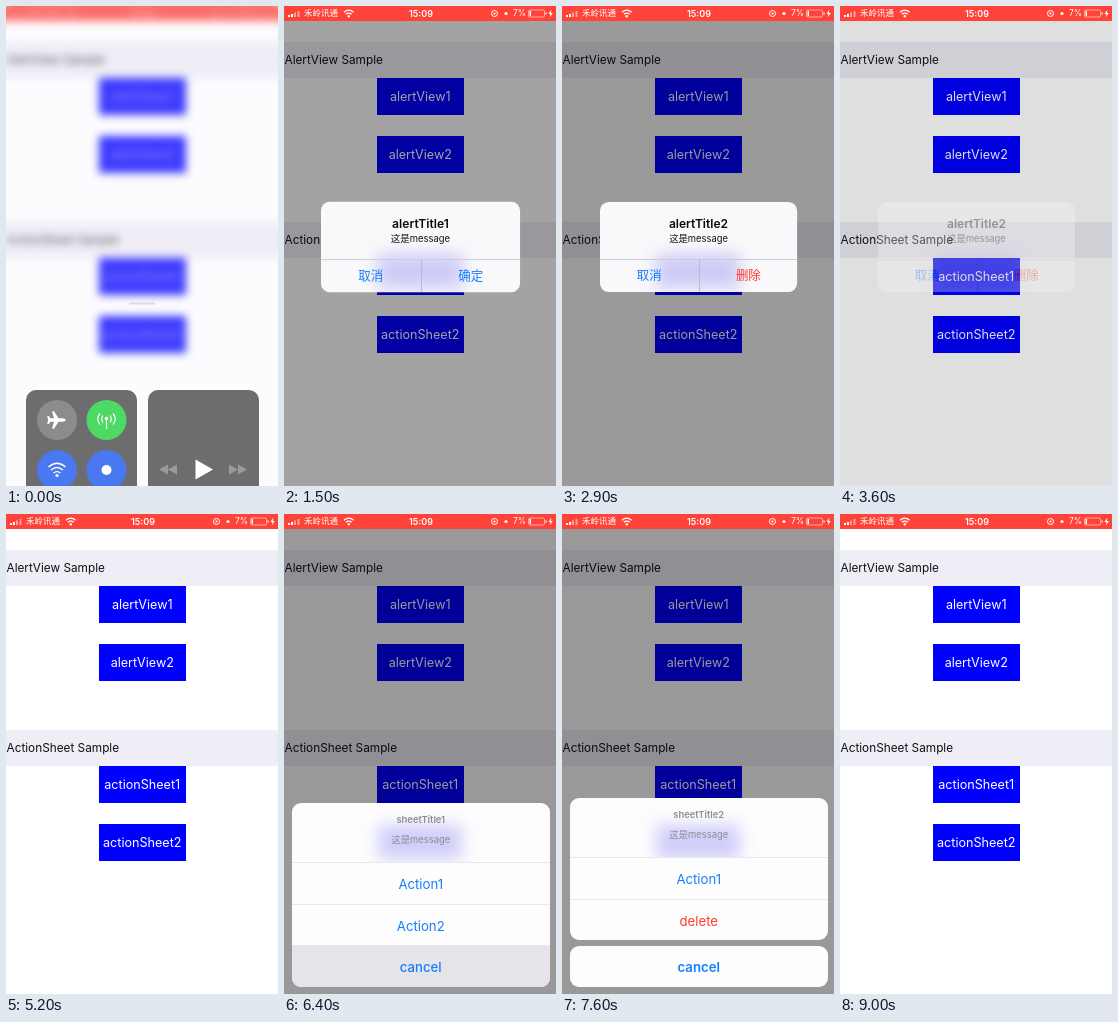
These frames come from a looping animation (272x480 px, 9100 ms). An HTML page:

```html
<!DOCTYPE html>
<html lang="zh-CN">
<head>
<meta charset="utf-8">
<title>Alert and sheet demo</title>
<style>
  html, body { margin: 0; width: 100%; height: 100%; overflow: hidden; background: #fff; }
  body { position: relative; font-family: Inter, "Noto Sans CJK SC", "Noto Sans CJK", sans-serif; }
  #stage { position: absolute; left: 0; top: 0; width: 272px; height: 480px; overflow: hidden; background: #fff; }
  #stage div, #stage svg { position: absolute; box-sizing: border-box; white-space: nowrap; }
  .full { inset: 0; }

  /* page */
  .head { left: -20px; width: 312px; height: 36px; padding-left: 20.5px; background: #efedf5;
    color: #111; font-size: 11.8px; line-height: 36px; }
  .btn { left: 92.5px; width: 87.5px; height: 36.5px; background: #00f; color: #fff;
    font-size: 12.6px; line-height: 38px; text-align: center; }
  .status { left: 0; top: 0; width: 272px; height: 15px; background: #ff4338; color: #fff;
    box-shadow: 0 -14px #ff4338, -20px 0 #ff4338, 20px 0 #ff4338; font-size: 8.5px; line-height: 15px; }
  .page, .status { animation: sharpen .04s .05s step-end both; }
  .btn, .status div, .status svg { animation: reveal .04s .05s step-end both; }

  /* control centre */
  .centre { animation: vanish .04s .05s step-end both; }
  .veil { background: rgba(244, 238, 250, .25); }

  /* overlays */
  .dim { background: rgba(0, 0, 0, .4); }
  .glow { width: 84px; height: 34px; background: rgba(30, 20, 230, .2); filter: blur(8px); }
  .alert { left: 38px; top: 196px; width: 197px; height: 89.5px; border-radius: 9px; overflow: hidden;
    text-align: center; background: #f9f9fb; }
  .alert .glow { left: 56px; top: 52px; }
  .alert .title { top: 13px; width: 100%; font-size: 12px; line-height: 17px; font-weight: 600; color: #0a0a0a; }
  .alert .msg { top: 30px; width: 100%; font-size: 9.35px; line-height: 14px; color: #111; }
  .alert .pick { top: 57px; width: 50%; height: 33px; border-top: 1px solid #cdccd6;
    font-size: 12.4px; line-height: 31px; color: #157efb; }
  .alert .pick + .pick { left: 50%; border-left: 1px solid #bcbbc9; }
  .sheet { left: 8px; width: 257.5px; text-align: center; }
  .card { left: 0; width: 100%; border-radius: 9px; overflow: hidden; background: #fdfdfe; }
  .info { left: 0; top: 0; width: 100%; height: 59px; overflow: hidden; color: #8e8d93; font-size: 9.4px; }
  .info .glow { left: 86px; }
  .info .title, .info .msg { width: 100%; line-height: 14px; }
  .info .title { top: 10px; font-weight: 600; }
  .info .msg { top: 30px; }
  .row { left: 0; width: 100%; height: 41.5px; border-top: 1px solid #e8e7ee;
    font-size: 13.2px; line-height: 42px; color: #157efb; }
  #stage .red { color: #ff3b30; }

  /* timeline */
  .a1 .dim { animation: fade .7s 1.1s cubic-bezier(.3, .3, .2, 1) both, unfade .4s 2s ease-out forwards; }
  .a1 .alert { animation: fade .35s 1.1s ease-out both, shrink .6s 1.1s cubic-bezier(.3, .3, .2, 1) both,
    unfade .4s 2s ease-out forwards; }
  .a2 .dim { animation: fade .6s 2.4s cubic-bezier(.2, .5, .2, 1) both, unfade .6s 3.3s ease-out forwards; }
  .a2 .alert { animation: fade .35s 2.4s ease-out both, shrink .6s 2.4s cubic-bezier(.2, .5, .2, 1) both,
    unfade .6s 3.3s ease-out forwards; }
  .s1 .dim { animation: fade .6s 5.2s cubic-bezier(.25, .6, .2, 1) both, unfade .5s 6.4s ease-in-out forwards; }
  .s1 .sheet { animation: rise .6s 5.2s cubic-bezier(.25, .6, .2, 1) both, drop .5s 6.4s ease-in-out forwards; }
  .s2 .dim { animation: fade .6s 7s cubic-bezier(.25, .6, .2, 1) both, unfade .5s 8.5s ease-in-out forwards; }
  .s2 .sheet { animation: rise .6s 7s cubic-bezier(.25, .6, .2, 1) both, drop .5s 8.5s ease-in-out forwards; }
  .pressed { animation: press .04s 6.35s step-end both; }

  @keyframes sharpen { from { filter: blur(4px); } to { filter: none; } }
  @keyframes reveal { from { color: rgba(255, 255, 255, .4); } to { color: #fff; } }
  @keyframes vanish { from { opacity: 1; } to { opacity: 0; } }
  @keyframes fade { from { opacity: 0; } to { opacity: 1; } }
  @keyframes unfade { from { opacity: 1; } to { opacity: 0; } }
  @keyframes shrink { from { transform: scale(1.2); } to { transform: none; } }
  @keyframes rise { from { transform: translateY(200px); } to { transform: none; } }
  @keyframes drop { from { transform: none; } to { transform: translateY(200px); } }
  @keyframes press { from { background-color: transparent; } to { background-color: #e4e4ea; } }
</style>
</head>
<body>
<div id="stage">
  <div class="page full">
    <div class="head" style="top:36px">AlertView Sample</div>
    <div class="btn" style="top:72px">alertView1</div>
    <div class="btn" style="top:130px">alertView2</div>
    <div class="head" style="top:216px">ActionSheet Sample</div>
    <div class="btn" style="top:252px">actionSheet1</div>
    <div class="btn" style="top:310px">actionSheet2</div>
  </div>

  <div class="full a1">
    <div class="dim full"></div>
    <div class="alert">
      <div class="glow"></div>
      <div class="title">alertTitle1</div>
      <div class="msg">这是message</div>
      <div class="pick" style="left:0">取消</div>
      <div class="pick">确定</div>
    </div>
  </div>

  <div class="full a2">
    <div class="dim full"></div>
    <div class="alert">
      <div class="glow"></div>
      <div class="title">alertTitle2</div>
      <div class="msg">这是message</div>
      <div class="pick" style="left:0">取消</div>
      <div class="pick red">删除</div>
    </div>
  </div>

  <div class="full s1">
    <div class="dim full"></div>
    <div class="sheet" style="top:289px;height:184px">
      <div class="card" style="top:0;height:184px">
        <div class="info">
          <div class="glow" style="top:22px"></div>
          <div class="title">sheetTitle1</div>
          <div class="msg">这是message</div>
        </div>
        <div class="row" style="top:59px">Action1</div>
        <div class="row" style="top:100.5px">Action2</div>
        <div class="row pressed" style="top:142px;height:42px;font-weight:500">cancel</div>
      </div>
    </div>
  </div>

  <div class="full s2">
    <div class="dim full"></div>
    <div class="sheet" style="top:284px;height:189px">
      <div class="card" style="top:0;height:142px">
        <div class="info">
          <div class="glow" style="top:27px"></div>
          <div class="title">sheetTitle2</div>
          <div class="msg">这是message</div>
        </div>
        <div class="row" style="top:59px">Action1</div>
        <div class="row red" style="top:100.5px">delete</div>
      </div>
      <div class="card" style="top:148px;height:41px">
        <div class="row" style="top:0;border:0;font-weight:600">cancel</div>
      </div>
    </div>
  </div>

  <div class="status">
    <div style="left:20px">禾岭讯通</div>
    <div style="left:101px;width:72px;text-align:center;font-size:9px;font-weight:600">15:09</div>
    <div style="left:229px">7%</div>
    <svg width="272" height="14" style="left:0;top:0" fill="currentColor" stroke="none">
      <path d="M4 9h2v2h-2zM7 8h2v3h-2z"/>
      <path d="M10 6.5h2v4.5h-2zM13.500 5h2v6h-2z" opacity=".5"/>
      <g fill="none" stroke="currentColor" stroke-width="1.3">
        <path d="M60 6.200q4.800-4 9.600 0M61.900 8.200q2.900-2.300 5.800 0"/>
        <circle cx="210.500" cy="7.500" r="3" stroke-width="1"/>
        <rect x="244.500" y="4" width="16" height="7" rx="1.500" stroke-width=".8" opacity=".7"/>
      </g>
      <circle cx="64.800" cy="10.200" r="1.200"/>
      <circle cx="210.500" cy="7.500" r="1.100"/>
      <circle cx="222" cy="7.500" r="1.600"/>
      <path d="M245.500 5h1.500v5h-1.500zM261.500 6.200h1v2.600h-1zM267.500 3.500l-3 4.500h2l-.7 3.500 3-4.500h-2z"/>
    </svg>
  </div>

  <div class="centre full">
    <div class="veil full"></div>
    <svg width="272" height="480" style="left:0;top:0" fill="#fff">
      <rect x="123" y="296.500" width="26" height="2" rx="1" fill="#dcd9e8"/>
      <g fill="#6d6c6e">
        <rect x="20" y="384" width="111" height="120" rx="10"/>
        <rect x="142" y="384" width="111" height="120" rx="10"/>
      </g>
      <circle cx="51" cy="414" r="20" fill="#8c8b8d"/>
      <circle cx="100.500" cy="414" r="20" fill="#4cd964"/>
      <circle cx="51" cy="464" r="20" fill="#4a78f0"/>
      <circle cx="100.500" cy="464" r="20" fill="#4a78f0"/>
      <path d="M60 414q-1-1.700-3.500-1.700h-4l-4.500-7h-2l2 7h-3.500l-1.700-2.300h-1.600l1 4-1 4h1.600l1.700-2.300h3.500l-2 7h2l4.500-7h4q2.500 0 3.500-1.700z"/>
      <g fill="none" stroke="#fff" stroke-width="1.200">
        <path d="M100.500 413v10"/>
        <path d="M97 409.500q-2.500 3.500 0 7M94 407.500q-4.500 5.500 0 11M104 409.500q2.500 3.500 0 7M107 407.500q4.500 5.500 0 11"/>
        <path d="M42.500 461q8.500-7.500 17 0M45 464q6-5 12 0M47.500 467q3.500-2.700 7 0" stroke-width="1.400"/>
      </g>
      <circle cx="100.500" cy="412.500" r="1.800"/>
      <circle cx="51" cy="469.500" r="1.600"/>
      <circle cx="100.500" cy="464" r="5"/>
      <path d="M189.500 453.500l17.500 10-17.500 10z"/>
      <path d="M162 458.500v10l-9-5zM171 458.500v10l-9-5zM223 458.500v10l9-5zM232 458.500v10l9-5z" fill="#9b9a9c"/>
    </svg>
  </div>
</div>

<script>
  const LOOP = 9100, STEP = 100, LEAD = 20;
  const anims = document.getAnimations();
  anims.forEach(a => a.pause());
  const start = performance.now();

  function draw() {
    const t = (performance.now() - start + LEAD) % LOOP;
    const tick = Math.floor(t / STEP) * STEP;
    anims.forEach(a => { a.currentTime = tick; });
    requestAnimationFrame(draw);
  }
  draw();
</script>
</body>
</html>
```
